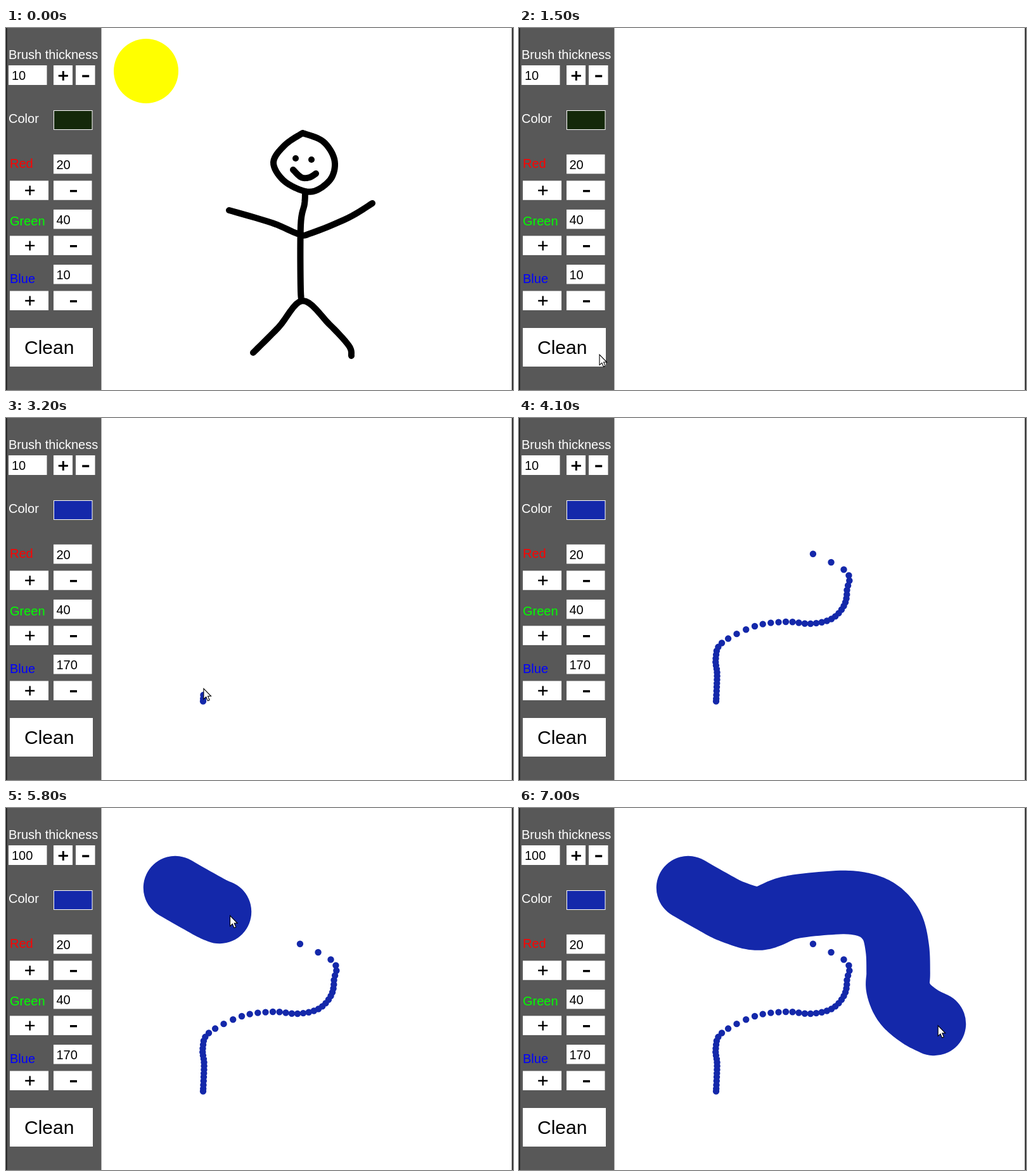
Recreate the animation shown at these times as an HTML page. Size 800 by 572 pixels, loop 7100 ms.

```html
<!DOCTYPE html>
<html lang="en">
<head>
<meta charset="utf-8">
<title>Paint program</title>
<style>
  html, body { margin: 0; width: 100%; height: 100%; overflow: hidden; background: #fff; }
  svg { display: block; width: 800px; height: 572px; }
  text { font: 20px "Liberation Sans", Arial, sans-serif; }
  .pen { fill: none; stroke: #1428aa; stroke-linecap: round; stroke-linejoin: round; }
</style>
</head>
<body>
<svg viewBox="0 0 800 572">
  <rect width="800" height="572" fill="#fff"/>
  <g id="doodle">
    <circle cx="221" cy="68" r="51" fill="#ff0"/>
    <circle cx="457" cy="206" r="5"/>
    <circle cx="482" cy="208" r="5"/>
    <path id="figure" class="pen" style="stroke:#000" stroke-width="10"/>
  </g>
  <path id="thin" class="pen" stroke-width="10.4"/>
  <path id="fat" class="pen" stroke-width="100.5"/>
  <rect width="150.5" height="572" fill="#585858"/>
  <path d="M.75 0V572M799 0V572" stroke="#1c1c1c" stroke-width="1.7"/>
  <g id="panel"></g>
  <path id="cursor" d="M0 0V16.6L3.8 13.1 6.4 19.3 9.2 18.1 6.7 12H11.6Z" fill="#fff" stroke="#000" stroke-width="1.1"/>
</svg>
<script>
const LOOP = 7100, STEP = 100;
const CLEAR_AT = 1100, THIN_AT = 3155, FAT_AT = 5600;
const $ = id => document.getElementById(id);
const clamp = (v, lo, hi) => Math.max(lo, Math.min(hi, v));
const pairs = list => list.trim().split(/\s+/).map(p => p.split(',').map(Number));

// Smooth curve through the key points; u counts key points
function at(pts, u) {
  u = clamp(u, 0, pts.length - 1);
  const i = Math.floor(u), f = u - i;
  const key = k => pts[clamp(k, 0, pts.length - 1)];
  const [a, b, c, d] = [i - 1, i, i + 1, i + 2].map(key);
  return [0, 1].map(j => b[j] + f / 2 * (c[j] - a[j] +
    f * (2 * a[j] - 5 * b[j] + 4 * c[j] - d[j] + f * (3 * (b[j] - c[j]) + d[j] - a[j]))));
}

function trace(pts, end = pts.length - 1) {
  if (end < 0) return '';
  const out = [];
  for (let u = 0; u < end; u += 0.125) out.push(at(pts, u));
  out.push(at(pts, end));
  return `M${out[0]}L${out.join('L')}`;
}

function dots(pts, end, perKey) {
  let d = '';
  for (let i = 0; i / perKey <= end; i++) d += `M${at(pts, i / perKey)}h.01`;
  return d;
}

const figure = [
  '468,166 500,179 518,207 514,236 491,256 468,257 437,240 422,212 440,185 468,166',
  '453,224 466,236 479,236 489,230',
  '472,259 471,278 465,312 465,415 468,431',
  '352,288 420,308 463,326 482,324 540,300 578,277',
  '390,513 430,473 468,431 510,468 541,502 545,518'
];
const thinPts = pairs(`311,447.5 312,425 312.5,402 310.5,380 320,355.5 372,329 421,322
  460,325 493,317.5 512.5,297 517.5,272 512.5,239.5 416,194`);
const fatPts = pairs(`267,126 302,146 337,164 380,174.5 425,158 484,150.5 530,150 565,161
  588,186 597,222 598.5,261 598,284 609,309 632,329 655,341 667,346`);

// [time, x, y] of the pointer's stops
const stops = [
  [300, 75, 585], [1000, 127, 516], [1500, 127, 516], [1800, 37, 430], [2500, 37, 430],
  [2900, 311, 448], [4000, 464, 215], [4600, 90, 76], [5200, 90, 76], [5600, 267, 126]
];

function pointer(t) {
  const i = clamp(stops.findIndex(s => s[0] > t), 0, stops.length);
  if (!i) return stops[0].slice(1);
  const [t0, x0, y0] = stops[i - 1], [t1, x1, y1] = stops[i];
  const u = (t - t0) / (t1 - t0), e = u * u * (3 - 2 * u);
  return [x0 + (x1 - x0) * e, y0 + (y1 - y0) * e];
}

// A held + button adds ten at an even rate
const count = (t, from, to, t0, t1) =>
  from + 10 * Math.floor((to - from) / 10 * clamp((t - t0) / (t1 - t0), 0, 1) + 1e-6);

const box = (x, y, w, h) => `<rect x="${x}" y="${y}" width="${w}" height="${h}" fill="#fff"/>`;
const label = (x, y, s, color = '#000', id = '', size = 20) =>
  `<text id="${id}" x="${x}" y="${y}" fill="${color}" style="font-size:${size}px">${s}</text>`;
const plus = (x, y, w) => `<path d="M${x - 7.5} ${y}h15M${x} ${y - 7.5}v15" stroke="#000" stroke-width="${w}"/>`;
const minus = (x, y) => `<path d="M${x - 5.5} ${y}h11" stroke="#000" stroke-width="3.4"/>`;

function channel([name, color, value], i) {
  const y = 199.8 + 87.1 * i, low = y + 41.5;
  return label(6, 221 + 91 * i, name, color) +
    box(75, y, 60.5, 30.5) + label(79.5, y + 23, value, '#000', name) +
    box(6, low, 61, 30.5) + plus(37.7, low + 15.5, 2.4) +
    box(75, low, 60.5, 30.5) + minus(106.5, low + 16.3);
}

$('panel').innerHTML =
  label(4, 49, 'Brush thickness', '#fff') +
  box(4, 59, 60.5, 31) + label(9, 82, 10, '#000', 'size') +
  box(75, 59, 30, 31) + plus(90.3, 75.5, 3) +
  box(110, 59, 30.5, 31) + minus(125.7, 76) +
  label(4, 150, 'Color', '#fff') +
  '<rect id="swatch" x="75.5" y="130.5" width="60.5" height="30" stroke="#fff"/>' +
  [['Red', '#f00', 20], ['Green', '#0f0', 40], ['Blue', '#00f', 10]].map(channel).join('') +
  box(6, 474, 131, 61) + label(29, 514.5, 'Clean', '#000', '', 30);

$('figure').setAttribute('d', figure.map(s => trace(pairs(s))).join(''));

function draw(t) {
  const blue = count(t, 10, 170, 1900, 2500);
  const thin = Math.min((t - THIN_AT) / 65, 11.5);
  const fat = (t - FAT_AT) / 100;
  $('doodle').style.display = t < CLEAR_AT ? '' : 'none';
  $('thin').setAttribute('d', dots(thinPts, thin, 4));
  $('fat').setAttribute('d', trace(fatPts, fat));
  $('Blue').textContent = blue;
  $('size').textContent = count(t, 10, 100, 4700, 5200);
  $('swatch').setAttribute('fill', `rgb(20,40,${blue})`);

  const tip = fat >= 0 ? at(fatPts, fat + 0.4)
    : t > THIN_AT && t < 4000 ? at(thinPts, thin + 0.2)
    : t >= 2900 && t < THIN_AT ? [311, 448]
    : pointer(t);
  const hidden = t < 400 || (t >= 4000 && t < 4200);
  $('cursor').style.display = hidden ? 'none' : '';
  $('cursor').setAttribute('transform', `translate(${tip})`);
}

const start = performance.now();
function frame() {
  const t = (performance.now() - start) % LOOP;
  draw(Math.floor(t / STEP) * STEP);
  requestAnimationFrame(frame);
}
frame();
</script>
</body>
</html>
```
